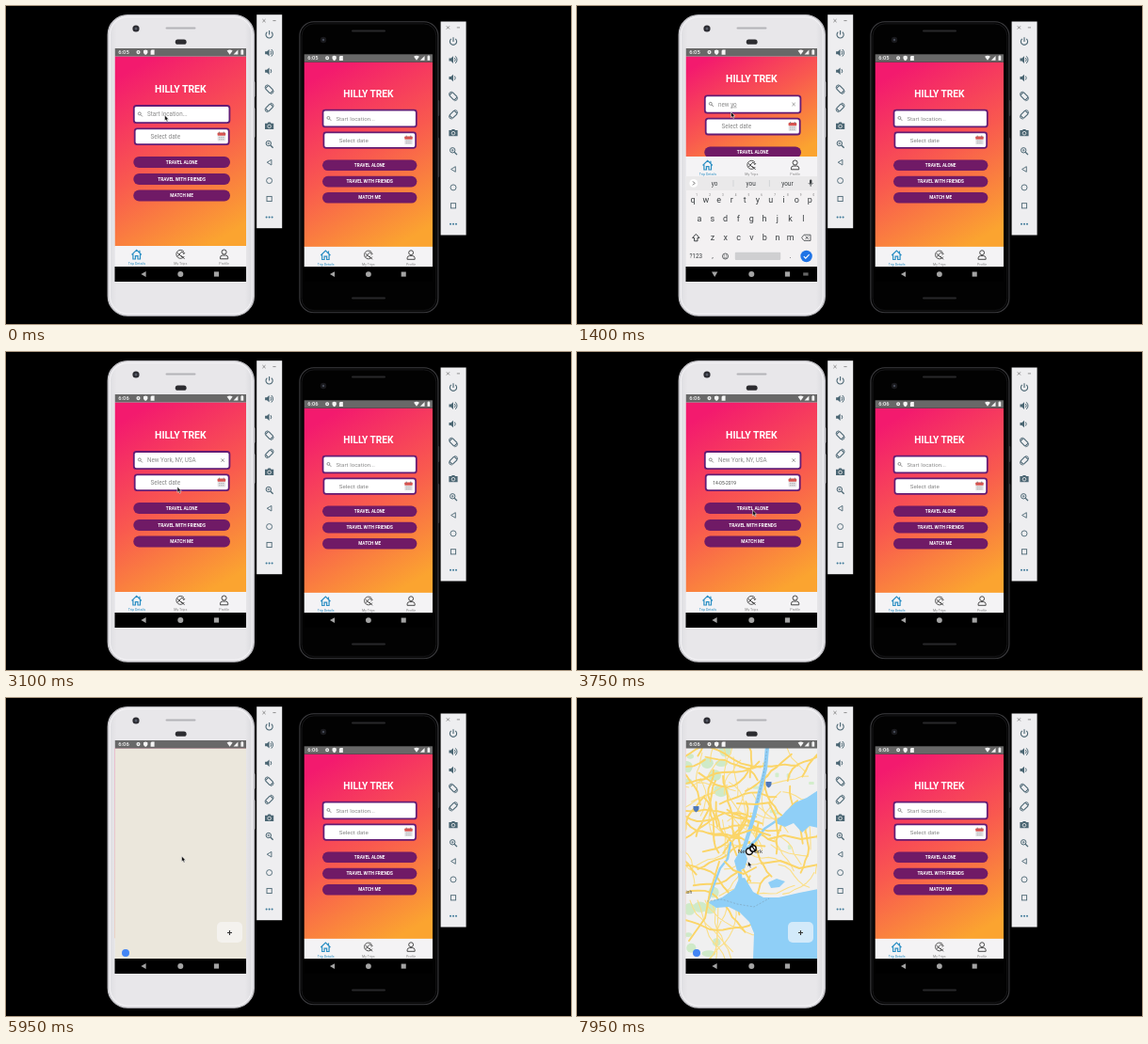
Recreate the animation shown at these times as an HTML page. Size 600 by 338 pixels, loop 8000 ms.

```html
<!DOCTYPE html>
<html lang="en">
<head>
<meta charset="utf-8">
<title>Two phones</title>
<style>
html, body { margin: 0; width: 100%; height: 100%; overflow: hidden; background: #000; }
svg { display: block; width: 100vw; height: 100vh; }
text { font-family: Roboto, Arial, sans-serif; white-space: pre; }
</style>
</head>
<body>
<svg id="stage" viewBox="0 0 600 338"></svg>
<script>
const LOOP = 8000;
const stage = document.getElementById('stage');

// Markup helpers
const rect = (x, y, w, h, fill, more = '') =>
  `<rect x="${x}" y="${y}" width="${w}" height="${h}" fill="${fill}" ${more}/>`;
const circle = (x, y, r, fill, more = '') =>
  `<circle cx="${x}" cy="${y}" r="${r}" fill="${fill}" ${more}/>`;
const fill = (d, color, more = '') => `<path d="${d}" fill="${color}" ${more}/>`;
const line = (d, color, w = 1, more = '') =>
  `<path d="${d}" fill="none" stroke="${color}" stroke-width="${w}" ${more}/>`;
const text = (x, y, size, color, s, more = '') =>
  `<text x="${x}" y="${y}" font-size="${size}" fill="${color}" ${more}>${s}</text>`;
const MID = 'text-anchor="middle"';
const at = (x, y, s) => `<g transform="translate(${x} ${y})">${s}</g>`;

function statusBar(id) {
  const w = '#f4f4f4';
  return rect(115.5, 45, 139.5, 8.5, '#686868') +
    text(119.2, 51.3, 5.9, w, '6:05', `font-weight="500" id="${id}clock"`) +
    circle(140.5, 49.1, 1.4, 'none', `stroke="${w}" stroke-width="1.3"`) +
    fill('M146 47.2L148.2 46.4 150.4 47.2V49.5Q150 51.4 148.2 52 146.4 51.4 146 49.5Z', w) +
    fill('M154.6 46.6H157.6V51.8H153.6V47.8Z', w) +
    fill('M234.6 47.6Q237.6 45.4 240.6 47.6L237.6 51.7Z', w) +
    fill('M246.4 46.6V51.6H241.6Z', w) +
    rect(249.4, 46.9, 2.8, 4.8, w) + rect(250.1, 46.2, 1.4, 1, w);
}

function navBar(id) {
  const c = '#a4a4a4';
  return rect(115.5, 277, 139.5, 16, '#000') +
    fill('M143.4 285L148.6 282V288Z', c, `id="${id}back"`) +
    circle(185.3, 285, 3, c) + rect(220.9, 282.4, 5.2, 5.2, c) +
    `<g id="${id}navKeys" visibility="hidden">` +
    fill('M143 282.5H149.4L146.2 288Z', c) +
    rect(240.2, 283.4, 5.4, 3.2, '#666') + '</g>';
}

function tabBar() {
  const blue = '#2b8fc4', ink = '#444';
  return rect(115.5, 255, 139.5, 22, '#f4f3f5') +
    at(138.7, 264, line('M-5.2 .4L0 -4.7 5.2 .4M-3.8 -.4V5H-1.3V1.6H1.3V5H3.8V-.4M3.2 -2V-4.2', blue, 1.2)) +
    at(185.3, 264, line('M3.7 -2.8A4.5 4.5 0 1 0 4 2', ink, .9) +
      line('M-3.2 -1.6L1.8 3M-3 2.2L.4 -1.8M.6 -2.8L4.4 -1.4 3 0M1 1.4L4.2 4.8', ink, 1)) +
    at(231.6, 264, circle(0, -2.5, 2.5, 'none', `stroke="${ink}" stroke-width="1"`) +
      line('M-4.1 4.8V3.2Q-3.9 1 -1.7 1H1.7Q3.9 1 4.1 3.2V4.8Z', ink, 1)) +
    text(139, 275.2, 3.7, blue, 'Trip Details', MID) +
    text(185.3, 275.2, 3.7, '#888', 'My Trips', MID) +
    text(231.6, 275.2, 3.7, '#888', 'Profile', MID);
}

const field = (x, y, w, h) => rect(x, y, w, h, '#fff', 'rx="2.6" stroke="#641c74" stroke-width="1.8"');

const calendar = rect(224.6, 135, 8.6, 8.6, '#e4e4e6', 'rx="1"') +
  rect(224.6, 134.6, 8.6, 3.2, '#d9534f', 'rx=".8"') +
  line('M226.6 133.6V135.6M231.2 133.6V135.6', '#777', .8) +
  line('M226 139.6H232M226 141.8H232', '#a9a9ad', 1, 'stroke-dasharray="1.2 .7"');

const pill = (y, s) => rect(135.3, y - 6, 102.7, 12, '#701a66', 'rx="6"') +
  text(186.6, y + 1.7, 4.75, '#fff', s, MID + ' font-weight="700"');

function home(id) {
  return rect(115.5, 53.5, 139.5, 202, `url(#${id}sun)`, `id="${id}bg"`) +
    `<g id="${id}form">` +
    text(185.3, 91.8, 10.4, '#fff', 'HILLY TREK', MID + ' font-weight="700"') +
    field(135.8, 106, 101.6, 18.2) + field(136.7, 130.3, 100, 16.8) +
    circle(141.8, 114.4, 1.5, 'none', 'stroke="#777" stroke-width=".8"') +
    line('M143 115.6L144.8 117.4', '#777', .9) +
    text(150, 117.2, 6.3, '#8b8b8b', 'Start location...', `id="${id}place"`) +
    line('M228.4 113.4L231.8 116.8M231.8 113.4L228.4 116.8', '#777', .7, `id="${id}clear" visibility="hidden"`) +
    text(153.4, 140.9, 6.4, '#858585', 'Select date', `id="${id}date"`) + calendar +
    pill(166.1, 'TRAVEL ALONE') + pill(183.9, 'TRAVEL WITH FRIENDS') + pill(201.5, 'MATCH ME') +
    `</g><g id="${id}tabs">${tabBar()}</g>`;
}

function keyboard() {
  const ink = '#3c4043';
  const row = (keys, x, y) => [...keys].map((k, i) =>
    text(x + i * 13.8, y, 9, ink, k, MID)).join('');
  const digits = [...'1234567890'].map((k, i) =>
    text(127.2 + i * 13.8, 201.6, 3, '#777', k, MID)).join('');
  const words = ['yo', 'you', 'your'].map((w, i) =>
    text(146 + i * 38.7, 191, 6.4, ink, w, MID)).join('');
  return rect(115.5, 181, 139.5, 96, '#f3f1f2') + rect(115.5, 181, 139.5, 15, '#eae9ea') +
    circle(123.8, 188.4, 4.4, '#fff') + line('M123 186.4L125 188.4 123 190.4', '#555', .9) +
    words + line('M166 185V192M204.4 185V192', '#c9cdd0', .7) +
    rect(247, 184.6, 2.4, 4.6, ink, 'rx="1.2"') + line('M245.8 188Q248.2 192 250.6 188M248.2 190V192', ink, .7) +
    digits + row('qwertyuiop', 123, 209) + row('asdfghjkl', 130, 229) + row('zxcvbnm', 144, 249) +
    line('M126.3 242.4L122.6 246.4H124.6V249.8H128V246.4H130Z', ink, 1) +
    line('M241 243.2H248V249.4H241L238.6 246.3ZM242.6 244.7L245.8 247.9M245.8 244.7L242.6 247.9', ink, .8) +
    text(126.3, 268.3, 6.4, ink, '?123', MID) + text(144, 268, 8, ink, ',', MID) +
    circle(157.5, 266, 3, 'none', `stroke="${ink}" stroke-width=".8"`) +
    line('M155.9 266.8Q157.5 268.8 159.1 266.8', ink, .6) +
    circle(156.4, 265, .5, ink) + circle(158.6, 265, .5, ink) +
    rect(167.8, 261.8, 48.4, 8.2, '#cfcfd1', 'rx="1"') + text(226.5, 268, 8, ink, '.', MID) +
    circle(243.6, 266, 6.2, '#1f74e6') + line('M240.8 266.1L242.8 268.1 246.6 264.1', '#fff', 1.1);
}

// City map: seeded wandering roads, water on top, then bridges
function cityMap() {
  let seed = 41;
  const rnd = () => (seed = (seed * 16807) % 2147483647) / 2147483647;
  const wander = (x, y, dir, steps, len) => {
    let d = `M${x.toFixed(1)} ${y.toFixed(1)}`;
    for (let i = 0; i < steps; i++) {
      dir += (rnd() - .5) * .8;
      x += Math.cos(dir) * len;
      y += Math.sin(dir) * len;
      d += `L${x.toFixed(1)} ${y.toFixed(1)}`;
    }
    return d;
  };
  const land = '#f0f0f0', water = '#8fcff7', road = '#fbd568';
  let s = rect(115, 53, 141, 225, land);
  for (let i = 0; i < 18; i++) {
    const north = i < 10;
    const x = 115 + rnd() * (north ? 45 : 35), y = north ? 55 + rnd() * 45 : 205 + rnd() * 68;
    s += `<ellipse cx="${x}" cy="${y}" rx="${3 + rnd() * 5}" ry="${2 + rnd() * 5}" fill="#cfeac8"/>`;
  }
  for (let i = 0; i < 9; i++) {
    s += rect(185 + rnd() * 65, 75 + rnd() * 100, 3 + rnd() * 4, 2 + rnd() * 4, '#d3edcb', 'rx="1"');
  }
  let minor = '', major = '';
  for (let i = 0; i < 50; i++) {
    minor += wander(115 + rnd() * 140, 54 + rnd() * 150, rnd() * 6.3, 6, 7);
  }
  for (let i = 0; i < 36; i++) {
    major += wander(125 + rnd() * 115, 60 + rnd() * 135, rnd() * 6.3, 9, 7);
  }
  for (let i = 0; i < 7; i++) {
    major += wander(115, 62 + i * 29, (rnd() - .5) * .9, 12, 7);
    minor += wander(120 + i * 8, 215, 1.5, 9, 8);
  }
  const join = 'stroke-linejoin="round" stroke-linecap="round"';
  s += line(minor, '#fbdf88', 1.1, join) + line(major, road, 1.9, join);
  s += fill('M256 203L236 207 214 212 198 212 187 206 178 191 172 192 167 203 154 212 139 217 148 223 161 222 173 228 183 238 188 250 187 278H256Z', water) +
    line('M202 52L200 75 194 100 188 125 181 148 176 164 172 180 174 196', water, 4.2, join) +
    fill('M178 163L172 164 167 173 170 184 178 181 181 171Z', water) +
    line('M180 160L190 151 199 139 211 131 222 124', water, 2.6, join) +
    fill('M211 133L222 120 232 111 244 106 256 98V138L247 136 239 143 230 133 221 137Z', water) +
    line('M163 154L160 171 152 181 146 197 140 214', water, 2.3, join) +
    fill('M203 196L212 192 221 195 215 201 206 202Z', water);
  s += line('M170 112L190 113 206 111M167 146L186 140 205 146M157 174L166 183 177 187 190 180M204 112L211 126 213 144M119 258L136 234 141 207 151 174M203 150L220 146 238 150 256 147M196 176L216 173 236 181 256 177', road, 1.9, join);
  s += line('M138 216L154 214 170 219 188 222 204 213M202 53L198 82 191 112', '#7d9eb4', .6, 'stroke-dasharray="2 1.6"');
  for (const [x, y] of [[126.5, 118], [203.5, 92]]) {
    s += fill(`M${x - 3} ${y - 3}H${x + 3}V${y}Q${x + 2} ${y + 3} ${x} ${y + 3.6}Q${x - 2} ${y + 3} ${x - 3} ${y}Z`, '#4f78b8');
  }
  return s + text(115.6, 208, 5, '#555', 'ish') +
    text(184, 165, 6.2, '#444', 'New York', MID) +
    circle(183, 163, 3.5, '#fff', 'stroke="#111" stroke-width="1.5"') +
    circle(187, 160, 3.2, '#fff', 'stroke="#111" stroke-width="1.5"') +
    circle(186.4, 155.8, 1.3, '#111') + line('M182 160L186 157.6 189.5 163', '#111', 1.3);
}

function mapScreen() {
  return rect(115.5, 53.5, 139.5, 223.5, '#ebe7dc') + `<g id="city">${cityMap()}</g>` +
    rect(224, 238, 27, 22, '#f4f2ee', 'rx="5" id="plusBox"') +
    line('M235 249.5H240M237.5 247V252', '#333', 1.1) + circle(127, 271, 4, '#4285f4');
}

function toolbar(x, y) {
  const c = '#4b6673';
  const vol = fill('M-4.5 -1.5H-2.5L0 -3.8V3.8L-2.5 1.5H-4.5Z', c);
  const tilt = rect(-2.4, -3.6, 4.8, 7.2, 'none', `rx=".8" transform="rotate(-45)" stroke="${c}" stroke-width="1.1"`) +
    line('M-4.6 -1.4Q-4.8 -4.6 -1.4 -4.9M4.6 1.4Q4.8 4.6 1.4 4.9', c, .9);
  const icons = [
    line('M-2.2 -2.8A3.6 3.6 0 1 0 2.2 -2.8M0 -4.4V.2', c, 1.1),
    vol + line('M1.4 -2Q3 0 1.4 2M2.2 -3.8Q5.8 0 2.2 3.8', c, 1),
    vol + line('M1.4 -2Q3 0 1.4 2', c, 1),
    tilt,
    `<g transform="scale(-1 1)">${tilt}</g>`,
    fill('M-4.6 -2.6H-2L-1.2 -3.8H1.2L2 -2.6H4.6V3.6H-4.6Z', c) + circle(0, .5, 1.8, c, 'stroke="#eee" stroke-width=".8"'),
    circle(-.8, -.8, 2.7, 'none', `stroke="${c}" stroke-width="1"`) + line('M1.2 1.2L4 4', c, 1.3) + line('M-2.2 -.8H.6M-.8 -2.2V.6', c, .7),
    line('M-2.4 0L2.3 -2.8V2.8Z', c, .9),
    circle(0, 0, 3, 'none', `stroke="${c}" stroke-width=".9"`),
    rect(-2.6, -2.6, 5.2, 5.2, 'none', `stroke="${c}" stroke-width=".9"`),
    [-3, 0, 3].map(d => circle(d, 0, 1, '#3d7898')).join('')
  ];
  return at(x, y, rect(0, 0, 27, 227, '#eeeef0') +
    line('M6.2 4.8L9.4 8M9.4 4.8L6.2 8M17.2 6.4H20.4', '#777', .8) +
    icons.map((s, i) => at(13.4, 21.2 + i * 19.4, s)).join(''));
}

const whitePhone = rect(262.5, 80, 2, 17, '#c9c9cd', 'rx="1"') + rect(262.5, 108, 2, 32, '#c9c9cd', 'rx="1"') +
  rect(108.2, 9.6, 155.2, 319.6, 'url(#shell)', 'rx="21" stroke="#c3c2c7" stroke-width="1.2"') +
  rect(110.4, 11.6, 150.8, 315.6, 'none', 'rx="19" stroke="#f6f5f8" stroke-width="1"') +
  rect(169.5, 22.5, 32, 2, '#b4b3b8', 'rx="1"') +
  circle(138, 24, 3.6, '#2b2b31') + circle(138, 24, 1.5, '#555a66') +
  rect(179.8, 35.6, 11.8, 5.2, '#2c2c30', 'rx="2.6"');

const blackPhone = rect(458, 100, 2.2, 17, '#38383b', 'rx="1"') + rect(458, 140, 2.2, 42, '#38383b', 'rx="1"') +
  rect(311.9, 16.8, 147, 309, '#020202', 'rx="15" stroke="#3d3d40" stroke-width="1.1"') +
  rect(314, 18.9, 142.8, 304.8, 'none', 'rx="13" stroke="#161618" stroke-width="1"') +
  rect(367, 25.4, 36, 2, '#28282a', 'rx="1"') + rect(367, 309.4, 36, 2, '#28282a', 'rx="1"') +
  circle(337, 36, 3.2, '#18181c') + circle(337, 36, 1.2, '#454a58');

const sunset = id => `<linearGradient id="${id}sun" gradientUnits="userSpaceOnUse">
  <stop offset="0" stop-color="#f31a6e"/><stop offset=".5" stop-color="#f9594f"/><stop offset="1" stop-color="#fba430"/>
  </linearGradient>`;

stage.innerHTML = `<defs>${sunset('a')}${sunset('b')}
  <linearGradient id="shell"><stop offset="0" stop-color="#dcdce0"/><stop offset=".06" stop-color="#e8e7ea"/>
    <stop offset=".94" stop-color="#e8e7ea"/><stop offset="1" stop-color="#d8d8dc"/></linearGradient>
  <clipPath id="screen">${rect(115.5, 45, 139.5, 232, '#000')}</clipPath></defs>` +
  rect(0, 0, 600, 338, '#000') + whitePhone + blackPhone + toolbar(266.2, 9.2) + toolbar(461.6, 16.5) +
  `<g clip-path="url(#screen)">${home('a')}<g id="keys">${keyboard()}</g>
  <g id="blank">${rect(115.5, 53.5, 139.5, 223.5, '#fdfdfd')}${at(183.3, 58.8, line('M-1 0A1 1 0 0 1 1 0', '#888', .7, 'id="spin"'))}</g>
  <g id="map">${mapScreen()}</g>${statusBar('a')}</g>` + navBar('a') +
  `<g transform="translate(316.7 59.6) scale(.977 .974) translate(-115.5 -53.5)">${home('b')}${statusBar('b')}${navBar('b')}</g>` +
  `<g id="mouse">${fill('M0 0V6L1.4 4.8 2.4 7 3.5 6.5 2.5 4.4H4.3Z', '#111', 'stroke="#fff" stroke-width=".5"')}</g>`;

const part = Object.fromEntries([...stage.querySelectorAll('[id]')].map(n => [n.id, n]));
const show = (name, on) => part[name].setAttribute('visibility', on ? 'inherit' : 'hidden');
const set = (name, attrs) => { for (const k in attrs) part[name].setAttribute(k, attrs[k]); };
const move = (name, x, y) => set(name, { transform: `translate(${x} ${y})` });
const clamp = v => Math.max(0, Math.min(1, v));

// Fit the background to a height; the gradient keeps its slant
function fitBackground(id, h) {
  const w = 139.5, dx = .5, dy = .866, half = .415 * (w * dx + h * dy);
  const cx = 115.5 + w / 2, cy = 53.5 + h / 2;
  set(id + 'bg', { height: h });
  set(id + 'sun', { x1: cx - dx * half, y1: cy - dy * half, x2: cx + dx * half, y2: cy + dy * half });
}
fitBackground('b', 202);

const OPEN = 350, CLOSE = 2050, DATED = 3400, BLANK = 4250, MAP = 5450, CITY = 6650;
const PATH = [[0, 168.5, 116], [500, 168.5, 116], [1100, 163.5, 112.5], [1500, 163.5, 112.5], [1900, 168, 125],
  [2050, 168, 125], [2500, 181, 138], [2900, 181, 138], [3650, 186.5, 168], [6800, 186.5, 168], [7700, 181.5, 173.5]];

function mouseAt(t) {
  const i = PATH.findIndex(p => p[0] > t);
  if (i < 0) return PATH[PATH.length - 1].slice(1);
  const [t0, x0, y0] = PATH[i - 1], [t1, x1, y1] = PATH[i];
  const u = (t - t0) / (t1 - t0), e = u * u * (3 - 2 * u);
  return [x0 + (x1 - x0) * e, y0 + (y1 - y0) * e];
}

function placeMarkup(t) {
  if (t >= CLOSE) return 'New York, NY, USA';
  const typed = 'new york'.slice(0, Math.max(0, Math.floor((t - 480) / 150)));
  if (!typed) return 'Start location...';
  const cut = typed.lastIndexOf(' ') + 1;
  return `${typed.slice(0, cut)}<tspan text-decoration="underline">${typed.slice(cut)}</tspan>`;
}

let lastPlace = '';
function draw(t) {
  const typing = t >= OPEN && t < CLOSE, dated = t >= DATED;
  const place = placeMarkup(t);
  if (place !== lastPlace) part.aplace.innerHTML = lastPlace = place;
  show('aclear', t >= 630);
  fitBackground('a', typing ? 106.5 : 202);
  move('aform', 0, typing ? -10.6 : 0);
  move('atabs', 0, typing ? -95 : 0);
  show('keys', typing);
  move('keys', 0, 96 * (1 - clamp((t - OPEN) / 120)));
  show('aback', !typing);
  show('anavKeys', typing);
  part.aclock.textContent = part.bclock.textContent = t < CLOSE ? '6:05' : '6:06';
  part.adate.textContent = dated ? '14-05-2019' : 'Select date';
  set('adate', dated ? { x: 144.2, y: 140.5, 'font-size': 4.95, fill: '#444' }
    : { x: 153.4, y: 140.9, 'font-size': 6.4, fill: '#858585' });
  show('blank', t >= BLANK && t < MAP);
  set('spin', { transform: `rotate(${(t - 5000) * .36})` });
  show('map', t >= MAP);
  show('city', t >= CITY);
  set('plusBox', { fill: t >= CITY ? '#d3eafa' : '#f4f2ee' });
  move('mouse', ...mouseAt(t));
}

function tick() {
  draw(performance.now() % LOOP);
  requestAnimationFrame(tick);
}
tick();
</script>
</body>
</html>
```
